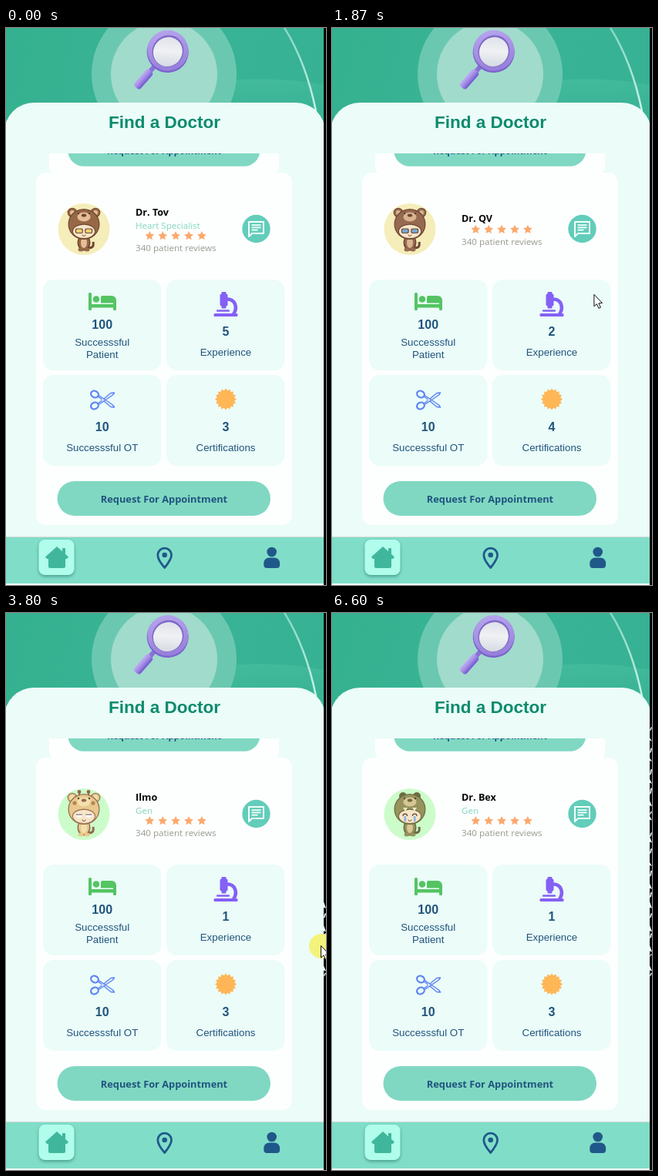
An HTML page with a canvas for the animation above (7410 ms loop, 415x724 px).

```html
<!DOCTYPE html>
<html lang="en">
<head>
<meta charset="utf-8">
<title>Find a Doctor</title>
<style>
html, body { margin: 0; width: 100%; height: 100%; overflow: hidden; background: #000; }
canvas { display: block; }
</style>
</head>
<body>
<canvas id="stage" width="415" height="724"></canvas>
<script>
const g = document.getElementById('stage').getContext('2d');
const LOOP = 7410, STEP = 64.28, FIRST = 380, PITCH = 432.5, TAU = Math.PI * 2;
const SANS = '"Liberation Sans", Arial, sans-serif';
const HUMAN = '"Open Sans", "Noto Sans", sans-serif';
const NAVY = '#20547c', MINT = '#ebfcf9', TEAL = '#80d8c2';

const doctors = [
  { name: 'Dr. Tov', field: 'Heart Specialist', years: 5, certs: 3, pet: 'bear', bg: '#f5edba' },
  { name: 'Dr. QV', field: '', years: 2, certs: 4, pet: 'cub', bg: '#f5edba' },
  { name: 'Ilmo', field: 'Gen', years: 1, certs: 3, pet: 'giraffe', bg: '#ccfcca' },
  { name: 'Nivora', field: '', years: 2, certs: 5, pet: 'dog', bg: '#fdd1cd' },
  { name: 'Dr. Bex', field: 'Gen', years: 1, certs: 3, pet: 'croc', bg: '#ccfcca' }
];

const tones = {
  bear: ['#976848', '#6f4630', '#e6bd95'],
  cub: ['#966a50', '#6e4834', '#d9b491'],
  giraffe: ['#e8c98c', '#93694f', '#f4dfae'],
  dog: ['#b98b66', '#815b48', '#e5c4a0'],
  croc: ['#97935c', '#6b6c42', '#d6c795']
};

// Drag from (x, y) to (tx, ty); share is the part of the page dragged by hand
const swipes = [
  { start: 960, drop: 1300, end: 1800, share: 0.7525, x: 285, y: 537, tx: 283, ty: 210 },
  { start: 2400, drop: 2650, end: 3150, share: 0.548, x: 384, y: 455, tx: 384, ty: 219 },
  { start: 3860, drop: 4080, end: 4430, share: 0.6, x: 408, y: 433, tx: 379, ty: 250 },
  { start: 5010, drop: 5200, end: 5497, share: 0.62, x: 410, y: 445, tx: 410, ty: 153 }
];
const entry = { drop: 450, tx: 416, ty: 490 };
const exit = { start: 6250, x: 417, y: 400 };

const clamp = v => Math.max(0, Math.min(1, v));
const mix = (a, b, u) => a + (b - a) * u;
const random = n => { const v = Math.sin(n * 127.1 + 3) * 43758.5; return v - Math.floor(v); };

function shape(color, draw) {
  g.beginPath();
  draw();
  g.fillStyle = color;
  g.fill();
}
function box(x, y, w, h, r, color) { shape(color, () => g.roundRect(x, y, w, h, r)); }
function oval(x, y, rx, ry, color, turn = 0) { shape(color, () => g.ellipse(x, y, rx, ry, turn, 0, TAU)); }
function disc(x, y, r, color) { oval(x, y, r, r, color); }
function poly(color, ...p) {
  shape(color, () => {
    for (let i = 0; i < p.length; i += 2) g.lineTo(p[i], p[i + 1]);
    g.closePath();
  });
}
function line(color, width, draw) {
  g.beginPath();
  draw();
  g.lineJoin = 'round';
  g.strokeStyle = color;
  g.lineWidth = width;
  g.stroke();
}
function fade(x0, y0, x1, y1, ...colors) {
  const f = g.createLinearGradient(x0, y0, x1, y1);
  colors.forEach((c, i) => f.addColorStop(i / (colors.length - 1), c));
  return f;
}
function text(str, x, y, font, color, align = 'center') {
  g.font = font;
  g.fillStyle = color;
  g.textAlign = align;
  g.fillText(str, x, y);
}
function spiky(x, y, n, outer, inner, color) {
  shape(color, () => {
    for (let i = 0; i < n * 2; i++) {
      const a = i * Math.PI / n - Math.PI / 2, r = i % 2 ? inner : outer;
      g.lineTo(x + r * Math.cos(a), y + r * Math.sin(a));
    }
    g.closePath();
  });
}

function position(t) {
  return swipes.reduce((p, { start, drop, end, share }) => p + (t < drop
    ? share * clamp((t - start) / (drop - start))
    : 1 - (1 - share) * (1 - clamp((t - drop) / (end - drop))) ** 3), 0);
}

function header() {
  g.fillStyle = fade(0, 0, 415, 110, '#34b18f', '#3ab496', '#36b193');
  g.fillRect(0, 0, 412, 150);
  shape(fade(0, 60, 0, 100, 'rgba(110,215,185,.22)', 'rgba(110,215,185,.08)'), () => {
    g.moveTo(150, 100);
    g.quadraticCurveTo(290, 50, 412, 74);
    g.lineTo(412, 140);
    g.lineTo(150, 140);
  });
  line(fade(0, 0, 0, 105, 'rgba(190,240,225,.6)', 'rgba(215,250,240,.9)'), 2.5, () => {
    g.moveTo(360, -2);
    g.quadraticCurveTo(389, 44, 402, 108);
  });
  disc(205, 60, 94, '#6bc8b0');
  disc(205, 60, 69, '#a1dbcc');
  magnifier();
  box(-2, 97, 416, 600, [38, 38, 0, 0], MINT);
  text('Find a Doctor', 205.5, 130, 'bold 22.5px ' + SANS, '#0c8b6d');
}

function magnifier() {
  g.save();
  g.translate(210, 30);
  g.rotate(0.72);
  box(-3, 25, 6, 13, 1, '#8a72d6');
  box(-5.5, 34, 11, 29, 4, fade(-6, 0, 6, 0, '#c3b4f4', '#a18be4', '#6d4fd0'));
  oval(0.5, 1, 27, 27, '#7b62cc');
  oval(-0.5, -0.5, 26.5, 26.5, fade(-26, -20, 26, 20, '#b9a7ee', '#9179d8'));
  oval(0, 0, 20, 21, '#7f68c9');
  oval(0.5, 0.8, 18.5, 19.5, fade(-15, -20, 15, 20, '#d9dce6', '#eff1f3', '#cfd5df'));
  g.restore();
}

function bed() {
  const c = '#54c463';
  box(107, 344, 4, 23, 1.5, c);
  box(107, 359, 36, 4.5, 0, c);
  box(139, 355, 4, 12, 1.5, c);
  disc(117, 352.5, 4.3, c);
  box(123, 348, 20, 9.5, [2, 6, 0, 0], c);
}

function microscope() {
  const c = '#8460f6';
  box(279.5, 343, 6, 21.5, 1, c);
  box(277.5, 345.5, 10, 16, 2, c);
  line(c, 4.5, () => {
    g.moveTo(287, 352.5);
    g.bezierCurveTo(297, 352.5, 301, 363, 295, 372);
  });
  box(273, 366.3, 17, 2.5, 1, c);
  box(269.5, 371, 31, 4, 1.5, c);
}

function scissors() {
  const c = '#5d84f3', y = 483.5;
  for (const k of [-1, 1]) {
    line(c, 2.3, () => g.ellipse(115, y + k * 7.5, 5, 4.2, -k * 0.45, 0, TAU));
    line(c, 1.5, () => {
      g.moveTo(119, y + k * 5);
      g.lineTo(136, y - k * 9);
      g.lineTo(140.5, y - k * 9.5);
      g.lineTo(138.5, y - k * 6.5);
      g.lineTo(121, y + k * 5.5);
    });
  }
  disc(125.5, y, 1.2, '#fff');
}

function chat() {
  const c = '#f4fffc';
  disc(324.5, 261, 18.2, '#62cdba');
  line(c, 2, () => {
    g.moveTo(315, 271);
    g.lineTo(315, 252);
    g.lineTo(334, 252);
    g.lineTo(334, 267);
    g.lineTo(319, 267);
    g.closePath();
  });
  for (let i = 0; i < 3; i++) box(318.5, 255.3 + i * 3.2, i < 2 ? 12 : 8, 1.8, 0, c);
}

function avatar({ pet, bg }) {
  const [coat, dark, pale] = tones[pet];
  const bear = pet === 'bear' || pet === 'cub';
  const ink = '#5a4238';
  const pair = draw => [-1, 1].forEach(k => draw(k, d => 101 + k * d));
  disc(101, 261.5, 33.5, bg);
  line(dark, 3, () => {
    g.moveTo(104, 285);
    g.quadraticCurveTo(115, 288, 113, 278);
  });
  oval(101, 279, 8.5, 10.5, dark);
  oval(101, 278, 7, 9.5, coat);
  oval(101, 279, 4, 7, pale);
  pair((k, at) => {
    oval(at(4), 288, 3.5, 2.5, coat);
    if (pet === 'dog') oval(at(18), 251, 5, 9, dark, -k * 0.5);
    else if (pet === 'croc') disc(at(9), 238, 5, dark);
    else [[6.3, dark], [5.2, coat], [3, pale]].forEach(([r, c]) => disc(at(15), 240, r, c));
    if (pet === 'giraffe') {
      box(at(6) - 1, 232, 2, 8, 1, dark);
      disc(at(6), 232.5, 2.4, dark);
    }
  });
  // hood, then face
  oval(101, 255, 20.5, 20, dark);
  oval(101, 255, 19.3, 18.8, coat);
  oval(101, 245.5, 8.5, 6, pale);
  oval(101, 243.5, 3.2, 2.1, dark);
  oval(101, 264, 15, 9.5, dark);
  oval(101, 264.3, 14, 8.6, '#f8e5c8');
  pair((k, at) => {
    const x = at(6.2);
    disc(at(7), 241, 1.2, ink);
    if (bear) {
      box(x - 5, 260.5, 10, 6.5, 2, '#6e4a38');
      box(x - 3.8, 261.6, 7.6, 4.3, 1.5, pet === 'bear' ? '#f0cf70' : '#77a7d0');
    } else if (pet === 'giraffe') {
      disc(at(12), 247, 2.6, '#b58655');
      oval(x, 263, 4, 2.8, '#fff');
      box(x - 4, 261.5, 8, 1, 0, ink);
    } else {
      line(ink, 1.2, () => g.arc(x, 264, 2.8, Math.PI, TAU));
    }
    if (pet === 'croc') {
      box(x - 1.4, 264, 2.8, 7, 1, '#8db5e5');
      poly('#e9e6bd', at(3), 253, at(9), 253, at(6), 258);
    }
  });
  line('#7b5442', 1, () => g.arc(101, 268.5, 2, 0, Math.PI));
}

function stat(col, row, value, ...label) {
  const x = 48 + col * 160, y = 327 + row * 124, mid = 124.7 + col * 160.3;
  const up = label.length > 1 ? 9 : 0;
  box(x, y, 153.5, 118, 14, MINT);
  text(value, mid, y + 73 - up, 'bold 16px ' + SANS, NAVY);
  label.forEach((s, i) => {
    text(s, mid, y + 99 - up * 1.4 + i * 16, '13.3px ' + SANS, NAVY);
  });
}

function card(doc, d, dim) {
  const s = 1 - 0.1 * Math.min(1, Math.abs(d));
  g.save();
  g.translate(205, 417 + PITCH * d);
  g.scale(s, s);
  g.translate(-205, -417);
  box(39.3, 188, 331.4, 458, 12, '#fdfffe');
  avatar(doc);
  const shift = doc.field ? 0 : 8.3;
  text(doc.name, 168, 244 + shift, 'bold 12.6px ' + HUMAN, '#080808', 'left');
  text(doc.field, 168, 261, '11.6px ' + HUMAN, '#82d5bf', 'left');
  for (let i = 0; i < 5; i++) spiky(186.3 + i * 16.9, 270.3 - shift, 5, 6.2, 3, '#fba96e');
  text('340 patient reviews', 168, 290 - shift, '11.6px ' + HUMAN, '#999990', 'left');
  chat();
  stat(0, 0, 100, 'Successsful', 'Patient');
  stat(1, 0, doc.years, 'Experience');
  stat(0, 1, 10, 'Successsful OT');
  stat(1, 1, doc.certs, 'Certifications');
  bed();
  microscope();
  scissors();
  spiky(285, 482.5, 16, 14, 11.4, '#ffb656');
  g.globalAlpha = dim;
  box(66.5, 589, 276.5, 45, 22.5, TEAL);
  text('Request For Appointment', 205, 616.5, 'bold 12.8px ' + HUMAN, '#20547f');
  g.restore();
}

function tabs() {
  const green = '#40b79d', blue = '#20588a';
  box(0, 661, 412, 63, 0, '#f3fbf9');
  box(0, 661, 412, 61, 0, '#80dec8');
  box(0, 661, 412, 1, 0, '#d8d8d8');
  g.save();
  g.shadowColor = 'rgba(20,90,80,.5)';
  g.shadowBlur = 4;
  g.shadowOffsetY = 2;
  box(42.5, 665, 46, 46, 8, '#affdea');
  g.restore();
  poly(green, 66, 674, 81, 687.5, 79, 690, 53, 690, 51, 687.5);
  box(73, 676, 4, 8, 1, green);
  box(55, 686, 22, 16, 2, green);
  line(blue, 2.8, () => {
    g.moveTo(205.7, 701.5);
    g.bezierCurveTo(200, 695, 196.8, 690, 196.8, 685);
    g.arc(205.7, 685, 8.9, Math.PI, TAU);
    g.bezierCurveTo(214.6, 690, 211, 695, 205.7, 701.5);
    g.closePath();
  });
  disc(205.7, 685, 3.3, blue);
  disc(344.7, 681, 6.3, blue);
  box(334.3, 688.5, 20.8, 13.5, [7, 7, 4, 4], blue);
}

// Dark edge where the pointer leaves white flecks, from the bottom up
function strip(t) {
  box(412, 0, 3, 724, 0, '#000');
  for (let i = 0; i < 25 && t > 3100 + i * 88; i++) {
    const y = 466 - i * 13.5 + random(i) * 8, h = 4 + random(i + 50) * 5;
    if (i % 2) poly('#fff', 412, y, 415, y + h, 412, y + h - 1);
    else poly('#fff', 412, y + h, 413, y + 1, 415, y, 414, y + h - 2);
  }
}

function pointer(t) {
  if (t < entry.drop || t > exit.start) return;
  let last = entry, next = exit;
  for (const s of swipes) {
    if (t >= s.drop) last = s;
    else { next = s; break; }
  }
  const dragging = t >= next.start;
  const u = dragging ? (t - next.start) / (next.drop - next.start)
    : clamp((t - last.drop) / (next.start - 100 - last.drop));
  const x = dragging ? mix(next.x, next.tx, u) : mix(last.tx, next.x, u);
  const y = dragging ? mix(next.y, next.ty, u) : mix(last.ty, next.y, u);
  if (!dragging && next !== exit && t > next.start - 90) disc(x + 1, y, 16, '#f3f37c');
  g.save();
  g.translate(x, y);
  poly('#fff', 0.5, -0.5, 0.5, 15, 4, 11.8, 6.5, 17.5, 9, 16.4, 6.5, 11, 11, 10.6);
  g.strokeStyle = '#111';
  g.lineWidth = 1;
  g.stroke();
  g.restore();
}

function draw(t) {
  g.clearRect(0, 0, 415, 724);
  header();
  const p = position(t);
  const press = clamp((t - 1060) / 150) * (1 - clamp((t - 1350) / 150));
  g.save();
  g.beginPath();
  g.rect(0, 163, 412, 484);
  g.clip();
  for (let i = Math.floor(p) - 1; i <= Math.min(4, Math.ceil(p)); i++) {
    card(doctors[(i + 5) % 5], i - p, i === 0 ? 1 - 0.35 * press : 1);
  }
  g.restore();
  tabs();
  strip(t);
  pointer(t);
}

// The screen refreshes in even steps, as a recording does
const begin = performance.now();
function tick() {
  const t = (performance.now() - begin) % LOOP;
  draw(FIRST + Math.floor((t - FIRST) / STEP) * STEP);
  requestAnimationFrame(tick);
}
tick();
</script>
</body>
</html>
```
